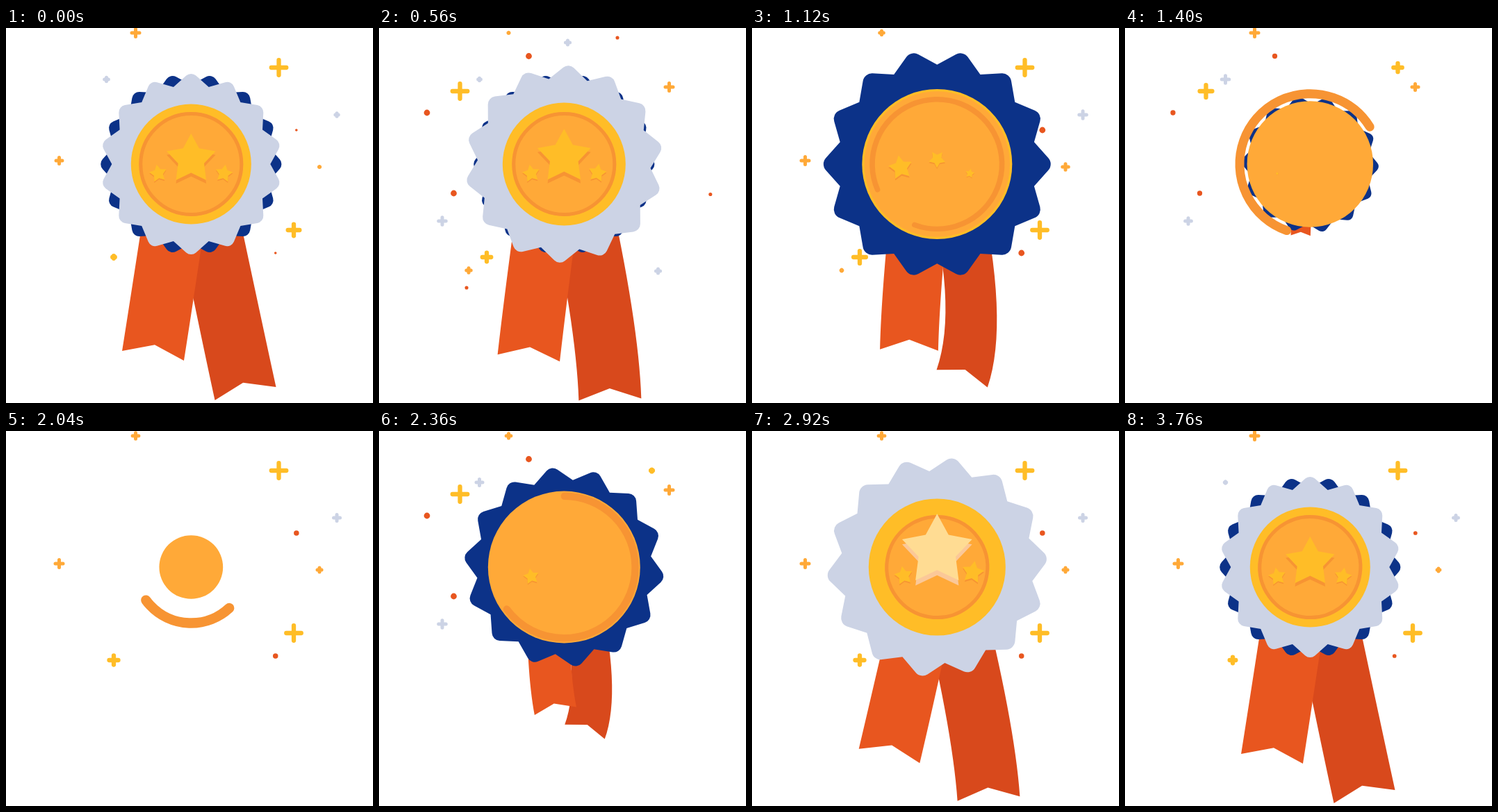
Animation of 528x540 px, one loop 3.8 s. Source, as an HTML page with a canvas:

```html
<!DOCTYPE html>
<html lang="en">
<head>
<meta charset="utf-8">
<title>Award rosette</title>
<style>
html, body { margin: 0; width: 528px; height: 540px; overflow: hidden; background: #fff; }
canvas { display: block; }
</style>
</head>
<body>
<canvas id="stage" width="528" height="540"></canvas>
<script>
const ctx = document.getElementById('stage').getContext('2d');
const LOOP = 3800, EMPTY = 1800; // the badge is gone at EMPTY, then returns
const CX = 266.3, CY = 196, TAU = Math.PI * 2, DEG = Math.PI / 180;
const BLUE = '#0c3288', GREY = '#ccd3e5', YELLOW = '#ffbd27', ORANGE = '#ffa938',
      DARK = '#f79433', RED = '#e8561f', DEEP_RED = '#d8491c',
      PALE = '#ffdc93', PALE_SHADE = '#fbc898';

const clamp = v => Math.max(0, Math.min(1, v));
const mix = (a, b, k) => a + (b - a) * k;
const smooth = k => (k = clamp(k), k * k * (3 - 2 * k));
const easeOut = k => 1 - (1 - clamp(k)) ** 3;
const ramp = (t, start, length) => smooth((t - start) / length);
const bell = (t, center, width) => Math.cos(clamp(Math.abs(t - center) / width) * Math.PI / 2) ** 2;

// Size of a part that swells and vanishes (peak at `out`), then pops in (peak at `in`) and settles.
const DISC_PACE = { swell: 520, fall: 570, pop: 480 };
const STAR_PACE = { swell: 320, fall: 480, pop: 320 };
function sizeAt(t, part, pace) {
  const { rest, peak } = part;
  if (t < part.out) return mix(rest, peak, ramp(t, part.out - pace.swell, pace.swell));
  if (t < EMPTY) return peak * (1 - ramp(t, part.out, pace.fall));
  if (t < part.in) return peak * easeOut((t - part.in + pace.pop) / pace.pop);
  return mix(peak, rest, ramp(t, part.in, 400));
}

// Steady turning that begins at `from` on the way out and ends at `to` on the way in.
const turnAt = (t, speed, from, to) =>
  speed * Math.max(0, t < EMPTY ? t - from : to - t);

const blue = { rest: 131, peak: 165, out: 1155, in: 2600 };
const grey = { rest: 131, peak: 167, out: 880, in: 2800 };
const yellow = { rest: 86.5, peak: 121, out: 1005, in: 2680 };
const orange = { rest: 75, peak: 110, out: 1249, in: 2442 };

const STARS = [
  { x: 266.3, y: 189, dx: 0, dy: -1.05, tilt: 0, spin: -0.12, rest: 37, peak: 54, out: 790, in: 2860 },
  { x: 219, y: 209.5, dx: -1.1, dy: -1.8, tilt: -10, spin: 0, rest: 13, peak: 20, out: 1020, in: 2600 },
  { x: 313.5, y: 209.5, dx: 1.2, dy: -1.75, tilt: 10, spin: 0, rest: 13, peak: 20, out: 830, in: 2720 }
];

// A pose is the middle of the ribbon's end and the tilt of that end in degrees.
const LEFT = {
  color: RED, out: 1025, topAt: tilt => 242 + 0.9 * tilt,
  rest: [211.5, 472, 9], hang: [223, 482, 1.3], swing: [248, 492, -10.9], settle: [197.5, 468, 13.3]
};
const RIGHT = {
  color: DEEP_RED, out: 980, topAt: tilt => 284 + 0.33 * tilt,
  rest: [344.5, 526.5, -12.3], hang: [308, 552, 19], swing: [310, 536, 20], settle: [340.5, 529.5, -4]
};

const CYCLE = 880;
const KINDS = {
  big: { color: YELLOW, life: 660, arm: 21.5, width: 6.3 },
  small: { color: ORANGE, life: 540, arm: 11, width: 5 },
  pale: { color: GREY, life: 470, arm: 10.5, width: 5 },
  dot: { color: RED, life: 470, radius: 4.4 }
};
// Twinkles light up in waves, each at its own point of the cycle.
const WAVES = [
  { start: 5, pale: [[144.5, 74]] },
  { start: 125, big: [[116.5, 91]], small: [[417.5, 85]], pale: [[91, 278]],
    dot: [[215.5, 40.5], [69, 122], [107.5, 238]] },
  { start: 330, big: [[155, 330]], small: [[129, 349]], pale: [[271.5, 21], [401.5, 350]],
    dot: [[343, 14], [476.8, 239.5], [126, 374]] },
  { start: 440, big: [[414, 291]], small: [[451, 200]] },
  { start: 565, big: [[392.5, 57]], small: [[76.5, 191]], pale: [[476, 125]],
    dot: [[417.8, 147], [387.7, 324]] },
  { start: 770, small: [[186.5, 7]] }
];

function twinkleClock(t) {
  if (t < 880) return mix(80, 600, t / 880);
  if (t < 2920) return t - 280;
  return mix(2640, 3600, (t - 2920) / (LOOP - 2920));
}

function fillCircle(x, y, r, color) {
  ctx.fillStyle = color;
  ctx.beginPath();
  ctx.arc(x, y, Math.max(0, r), 0, TAU);
  ctx.fill();
}

function drawTwinkle(x, y, k, kind) {
  if (kind.radius) return fillCircle(x, y, kind.radius * k, kind.color);
  const h = kind.arm * k / 2;
  ctx.strokeStyle = kind.color;
  ctx.lineWidth = kind.width;
  ctx.beginPath();
  ctx.moveTo(x - h, y); ctx.lineTo(x + h, y);
  ctx.moveTo(x, y - h); ctx.lineTo(x, y + h);
  ctx.stroke();
}

function drawTwinkles(t) {
  const now = twinkleClock(t) + CYCLE;
  for (const wave of WAVES) {
    const age = (now - wave.start) % CYCLE;
    for (const name in KINDS) {
      const kind = KINDS[name];
      const k = clamp(Math.min(age / 140, (kind.life - age) / 180));
      if (k > 0) (wave[name] || []).forEach(([x, y]) => drawTwinkle(x, y, k, kind));
    }
  }
}

function poseAt(t, r) {
  const blend = (a, b, k) => a.map((v, i) => mix(v, b[i], k));
  if (t < EMPTY) return blend(r.rest, r.hang, ramp(t, 360, 520));
  if (t < 2920) return blend(r.swing, r.settle, ramp(t, 2600, 320));
  return blend(r.settle, r.rest, ramp(t, 2920, 520));
}

function drawRibbon(t, r) {
  const scale = t < EMPTY ? 1 - ramp(t, r.out, 600) : easeOut((t - 2260) / 320);
  if (scale < 0.01) return;
  const [x, y, tilt] = poseAt(t, r);
  const topX = r.topAt(tilt), topY = 220, half = 45;
  const sin = Math.sin(tilt * DEG), cos = Math.cos(tilt * DEG);
  const reach = (y - topY) * 0.35;
  const bendX = x + sin * reach, bendY = y - cos * reach;
  const tip = side => [x + side * half * cos, y + side * half * sin];
  const bend = side => [bendX + side * half * cos, bendY + side * half * sin];
  ctx.save();
  ctx.translate(CX, 215);
  ctx.scale(scale, scale);
  ctx.translate(-CX, -215);
  ctx.fillStyle = r.color;
  ctx.beginPath();
  ctx.moveTo(topX - half, topY);
  ctx.quadraticCurveTo(...bend(-1), ...tip(-1));
  ctx.lineTo(x + sin * 16, y - cos * 16);
  ctx.lineTo(...tip(1));
  ctx.quadraticCurveTo(...bend(1), topX + half, topY);
  ctx.fill();
  ctx.restore();
}

function drawRosette(radius, turn, color) {
  if (radius < 1) return;
  const step = TAU / 14, valley = 0.87, apex = 1.02;
  const at = (r, a) => [CX + Math.sin(a) * r * radius, CY - Math.cos(a) * r * radius];
  ctx.fillStyle = color;
  ctx.beginPath();
  for (let i = 0; i < 14; i++) {
    const a = turn * DEG + i * step;
    ctx.lineTo(...at(valley, a - step / 2));
    ctx.arcTo(...at(apex, a), ...at(valley, a + step / 2), radius * 0.08);
  }
  ctx.fill();
}

function drawRing(t) {
  const leaving = t < EMPTY;
  const sweep = 360 * (leaving ? 1 - clamp((t - 745) / 1047) ** 2 : clamp((t - 1815) / 842));
  if (sweep < 0.5) return;
  const start = leaving ? sweep / 2 : 143.7 - sweep;
  const radius = 72.5 + 30 * (bell(t, 1330, 560) + bell(t, 2335, 450));
  ctx.strokeStyle = DARK;
  ctx.lineWidth = 5 + 9.5 * ramp(t, 880, 700) * (1 - ramp(t, 2040, 700));
  ctx.beginPath();
  ctx.arc(CX, CY, radius, start * DEG, (start + sweep) * DEG);
  ctx.stroke();
}

function fillStar(x, y, r, turn, color) {
  ctx.fillStyle = color;
  ctx.beginPath();
  for (let i = 0; i < 10; i++) {
    const a = turn * DEG + i * TAU / 10, d = i % 2 ? r * 0.53 : r;
    ctx.lineTo(x + Math.sin(a) * d, y - Math.cos(a) * d);
  }
  ctx.fill();
}

function drawStar(t, star) {
  const r = sizeAt(t, star, STAR_PACE);
  if (r < 0.3) return;
  const grow = Math.max(0, r - star.rest);
  const x = star.x + star.dx * grow, y = star.y + star.dy * grow;
  const turn = star.tilt + turnAt(t, star.spin, 830, 2790);
  const sincePeak = t - (t < EMPTY ? star.out : star.in);
  const lit = sincePeak >= -40 && sincePeak < 80;
  fillStar(x, y + r * 0.14, r, turn, lit ? PALE_SHADE : DARK);
  fillStar(x, y, r, turn, lit ? PALE : YELLOW);
}

function draw(t) {
  ctx.fillStyle = '#fff';
  ctx.fillRect(0, 0, 528, 540);
  ctx.lineCap = 'round';
  drawTwinkles(t);
  drawRibbon(t, RIGHT);
  drawRibbon(t, LEFT);
  const disc = part => sizeAt(t, part, DISC_PACE);
  drawRosette(disc(blue), 180 / 14 + turnAt(t, 0.024, 1317, 2600), BLUE);
  drawRosette(disc(grey), turnAt(t, 0.024, 450, 3265), GREY);
  fillCircle(CX, CY, disc(yellow), YELLOW);
  fillCircle(CX, CY, disc(orange), ORANGE);
  drawRing(t);
  STARS.forEach(star => drawStar(t, star));
}

const begin = performance.now();
function frame() {
  draw((performance.now() - begin) % LOOP);
  requestAnimationFrame(frame);
}
frame();
</script>
</body>
</html>
```
